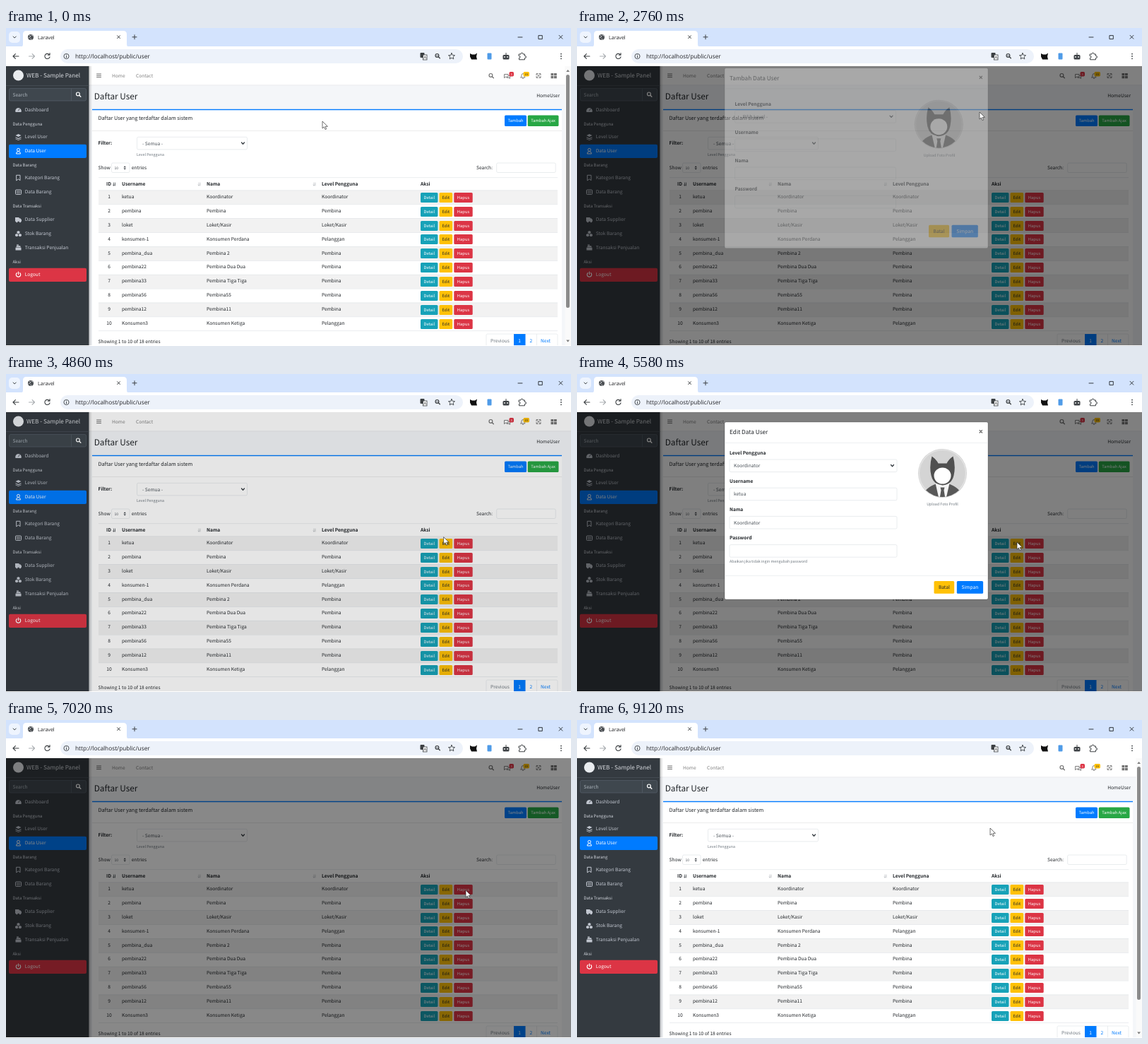
An HTML page that plays this animation: 800 px wide and 450 px high, repeating every 9180 ms.

```html
<!DOCTYPE html>
<html lang="id">
<head>
<meta charset="utf-8">
<title>Daftar User</title>
<style>
  html, body { margin: 0; width: 100%; height: 100%; overflow: hidden; background: #fff; }
  svg { display: block; width: 100vw; height: 100vh; }
  text { font-family: "Noto Sans CJK JP", "Noto Sans CJK SC", "Noto Sans CJK", "Open Sans", sans-serif;
         text-rendering: geometricPrecision; white-space: pre; }
  .ui { font-family: "Open Sans", "Noto Sans", sans-serif; }
</style>
</head>
<body>
<svg id="stage" viewBox="0 0 800 450" xmlns="http://www.w3.org/2000/svg"></svg>
<script>
const LOOP = 9180, STEP = 60;
const TOP = 54, HEIGHT = 395; // page area below the browser bars
const BLUE = '#007bff', RED = '#dc3545', YELLOW = '#ffc107', TEAL = '#17a2b8', GREEN = '#28a745';
const INK = '#212529', BORDER = '#d3d8dd', LINE = '#dee2e6', MUTED = '#6c757d';
const BODY = 6.63, SMALL = 5.3, BTN = 5.8;

// Drawing helpers; every one returns SVG markup.
const rect = (x, y, w, h, fill, more = '') =>
  `<rect x="${x}" y="${y}" width="${w}" height="${h}" fill="${fill}" ${more}/>`;
const box = (x, y, w, h) => rect(x, y, w, h, '#fff', `rx="1.8" stroke="${BORDER}" stroke-width=".5"`);
const circle = (x, y, r, fill, more = '') => `<circle cx="${x}" cy="${y}" r="${r}" fill="${fill}" ${more}/>`;
const line = (d, color = INK, w = 1) =>
  `<path d="${d}" fill="none" stroke="${color}" stroke-width="${w}" stroke-linecap="round" stroke-linejoin="round"/>`;
const shape = (d, fill) => `<path d="${d}" fill="${fill}"/>`;
const at = (x, y, body) => `<g transform="translate(${x} ${y})">${body}</g>`;
const text = (x, cy, s, { size = BODY, fill = INK, bold, anchor = 'start', cls = '' } = {}) =>
  `<text x="${x}" y="${cy + size * 0.36}" font-size="${size}" fill="${fill}" class="${cls}"
    font-weight="${bold ? 700 : 400}" text-anchor="${anchor}">${s}</text>`;
const button = (x, y, w, h, label, fill, size = BTN) =>
  rect(x, y, w, h, fill, 'rx="1.6"') +
  text(x + w / 2, y + h / 2, label, { size, fill: fill === YELLOW ? INK : '#fff', anchor: 'middle' });
const chevron = (x, y) => line(`M${x - 2} ${y - 1}l2 2.2 2-2.2`, '#343a40', 1.3);
const lens = (x, y, color) =>
  circle(x - .6, y - .6, 2.4, 'none', `stroke="${color}" stroke-width="1.2"`) + line(`M${x + 1.3} ${y + 1.3}l2 2`, color, 1.4);
const cross = (x, y, r, color = INK, w = .9) =>
  line(`M${x - r} ${y - r}l${2 * r} ${2 * r}m0 ${-2 * r}l${-2 * r} ${2 * r}`, color, w);

function browser() {
  const dark = '#3c4043', ui = size => ({ size, fill: '#202124', cls: 'ui' });
  return rect(0, 0, 800, 27, '#d3e3fd') + rect(0, 26, 800, TOP - 26, '#fff') +
    rect(4, 5, 16, 16, '#eef4fe', 'rx="5"') + line('M10.2 12l2 2.1 2-2.1', dark) +
    shape('M20 27q4 0 4-4V9q0-5 5-5h137q5 0 5 5v14q0 4 4 4z', '#fff') +
    circle(35, 13, 4, '#4a4e52') + line('M33 10l2 2-3 2m4-4l2 1m-3 4l1 2', '#d8dadd', .9) +
    text(45, 13, 'Laravel', ui(7.1)) + cross(159.5, 12.7, 1.9) + line('M182 9.8v6m-3-3h6', dark) +
    line('M725 13h6M754.3 10.6h5v5h-5z', INK, .9) + cross(785.5, 12.8, 2.4) +
    line('M18 40h-8m3.4-3.4L10 40l3.4 3.4', dark, 1.1) + line('M32.5 40h8m-3.4-3.4l3.4 3.4-3.4 3.4', '#a9adb1', 1.1) +
    line('M61.4 37.8a3.6 3.6 0 1 0 .6 3M62 35.5v2.7h-2.7', dark, 1.1) +
    rect(77, 30, 570, 20, '#edf2fa', 'rx="10"') +
    circle(85.5, 40, 3.6, 'none', `stroke="${dark}" stroke-width=".9"`) + line('M85.5 39.8v2M85.5 38v.1', dark) +
    text(98, 39.7, 'http://localhost/public/user', ui(8.3)) +
    rect(586.5, 35, 6, 7, dark, 'rx="1"') + rect(590.5, 38, 5.5, 7, '#fff', `stroke="${dark}" stroke-width=".8"`) +
    line('M592 43l1.3-3 1.3 3', dark, .7) +
    lens(611, 39.5, dark) + line('M609.5 39h2', dark, .7) +
    line('M631 35.5l1.3 2.9 3.2.3-2.4 2.1.7 3.1-2.8-1.6-2.8 1.6.7-3.1-2.4-2.1 3.2-.3z', dark, .9) +
    shape('M657 36l3 1.5h4l3-2-1 5 1 4h-8l-2-4z', '#111') +
    rect(681.5, 35.5, 6, 9, '#4f9be8', 'rx="1"') +
    rect(703.5, 38, 9, 6.5, '#3f4347', 'rx="1.5"') + circle(706, 41, .9, '#fff') + circle(710, 41, .9, '#fff') +
    line('M708 38v-2.5', dark) +
    line('M726.5 37h2.5q0-2 1.5-2t1.5 2h2.5v2.5q2 0 2 1.5t-2 1.5v2.3h-8v-2.6q1.7 0 1.7-1.3t-1.7-1.3z', dark, 1) +
    [36.7, 40, 43.3].map(y => circle(786, y, .9, dark)).join('');
}

// Small sidebar icons, centred on 0,0.
const ICONS = {
  gauge: c => shape('M-4 3a4.3 4.3 0 1 1 8 0z', c) + line('M0 1l1.6-2.6', '#343a40', .8),
  layers: c => shape('M0-4l4 2-4 2-4-2zM-4 .2l4 1.8 4-1.8v1l-4 2-4-2zM-4 2.4l4 1.8 4-1.8v.8L0 5l-4-1.8z', c),
  person: c => circle(0, -1.6, 2, 'none', `stroke="${c}"`) + line('M-3 3.6q0-3 3-3t3 3z', c),
  mark: c => line('M-2.5-3.7h5v7.4L0 1.7l-2.5 2z', c),
  list: c => rect(-4, -3, 8, 6.5, 'none', `stroke="${c}" rx="1"`) + line('M-2.3-.8h4.6M-2.3 1.3h4.6', c, .9),
  truck: c => shape('M-4.5-3h5.5v1.3h1.7l1.8 2v2.4h-9z', c) + circle(-2.2, 3, 1.3, c) + circle(2.5, 3, 1.3, c),
  cubes: c => shape('M0-4l2 1v2.2L0 .2-2-.8V-3zM-2.4 0l2 1v2.2l-2 1-2-1V1zM2.4 0l2 1v2.2l-2 1-2-1V1z', c),
  till: c => shape('M-4 .3h8V4h-8zM-3.2-.3l.8-2h5l.8 2zM-2.5-4h3v1.3h-3z', c),
  power: c => line('M-2.2-2.3a3.2 3.2 0 1 0 4.4 0M0-4v3.6', c, 1.2)
};

const MENU = [
  [116, 'Dashboard', 'gauge'], [136, 'Data Pengguna'], [154, 'Level User', 'layers'],
  [174, 'Data User', 'person', BLUE], [194, 'Data Barang'], [212, 'Kategori Barang', 'mark'],
  [232, 'Data Barang', 'list'], [252, 'Data Transaksi'], [271, 'Data Supplier', 'truck'],
  [291, 'Stok Barang', 'cubes'], [310.5, 'Transaksi Penjualan', 'till'], [331, 'Aksi'],
  [349, 'Logout', 'power', RED]
];

function sidebar() {
  const pale = '#c2c7d0';
  const items = MENU.map(([y, label, icon, fill]) => {
    if (!icon) return text(9.5, y, label, { size: 5.95, fill: '#d0d4db' });
    const color = fill ? '#fff' : pale;
    return (fill ? rect(4, y - 9.3, 110, 19.3, fill, 'rx="2"') : '') +
      at(17.5, y, ICONS[icon](color)) + text(26.7, y, label, { fill: color });
  });
  return rect(117, TOP, 5, HEIGHT, 'url(#edge)') +
    rect(0, TOP, 117.4, HEIGHT, '#343a40') + rect(0, 81, 117.4, .7, '#4b545c') +
    circle(17.5, 67, 7.5, '#e9ecef') + text(29, 67.5, 'WEB - Sample Panel', { size: 8.2, fill: '#d5d8dc' }) +
    rect(4.5, 85.5, 109, 17.5, '#3f474e', 'rx="2" stroke="#56606a" stroke-width=".7"') +
    rect(92, 85.5, .7, 17.5, '#56606a') +
    text(9.5, 94.5, 'Search', { fill: '#adb5bd' }) + lens(102.5, 94, '#fff') + items.join('');
}

function navbar() {
  const gray = '#737373';
  return rect(117, TOP, 683, HEIGHT, '#f4f6f9') + rect(117, TOP, 683, 27, '#fff') + rect(117, 80.6, 683, .6, LINE) +
    line('M128.5 65h6M128.5 67.3h6M128.5 69.6h6', gray, 1) +
    text(150, 67.5, 'Home', { fill: '#808080' }) + text(184, 67.5, 'Contact', { fill: '#808080' }) +
    lens(687, 67.5, gray) +
    line('M705.5 70.5v-5h5.5v3.7h-3.6zM712 67.5h1.5v4l-1.5-1.2h-3', gray, .9) +
    rect(712.5, 62, 6.5, 6.5, RED, 'rx="1.8"') + text(715.7, 65.3, '3', { size: 4, fill: '#fff', anchor: 'middle' }) +
    line('M729 70h6q-1-1-1-3.2t-2-2.2-2 2.2-1 3.2M731.4 71.3h1.2', gray, .9) +
    rect(732.5, 62, 8.5, 6.5, YELLOW, 'rx="1.8"') + text(736.7, 65.3, '15', { size: 4, anchor: 'middle' }) +
    line('M751 66.5v-2h2m2 0h2v2m0 2v2h-2m-2 0h-2v-2M752 65.5l4 4m0-4l-4 4', gray, .9) +
    [[771.5, 64], [776, 64], [771.5, 68], [776, 68]].map(([x, y]) => rect(x, y, 3.8, 3.3, gray)).join('') +
    text(124.7, 96.5, 'Daftar User', { size: 11.8 }) + text(784, 95.5, 'HomeUser', { anchor: 'end' });
}

const USERS = [
  ['ketua', 'Koordinator', 'Koordinator'], ['pembina', 'Pembina', 'Pembina'],
  ['loket', 'Loket/Kasir', 'Loket/Kasir'], ['konsumen-1', 'Konsumen Perdana', 'Pelanggan'],
  ['pembina_dua', 'Pembina 2', 'Pembina'], ['pembina22', 'Pembina Dua Dua', 'Pembina'],
  ['pembina33', 'Pembina Tiga Tiga', 'Pembina'], ['pembina56', 'Pembina55', 'Pembina'],
  ['pembina12', 'Pembina11', 'Pembina'], ['Konsumen3', 'Konsumen Ketiga', 'Pelanggan']
];

function table() {
  const pitch = 19.88, top = 229.6;
  const head = [[164, 'Username'], [284, 'Nama'], [447, 'Level Pengguna'], [587, 'Aksi']];
  const sort = (x, color) => line(`M${x} 219v4m-1-1l1 1.2 1-1.2M${x + 2} 223v-4`, color, .7);
  const rows = USERS.map((user, i) => {
    const y = top + pitch * i, mid = y + 9, by = Math.round(y + 3.2);
    return (i % 2 ? '' : rect(131, y, 650, pitch, '#f2f2f2')) + rect(131, y, 650, .6, LINE) +
      text(146, mid, i + 1, { anchor: 'middle' }) +
      user.map((s, k) => text(head[k][0], mid, s)).join('') +
      button(587, by, 24.5, 14, 'Detail', TEAL) + button(613.5, by, 18.7, 14, 'Edit', YELLOW) +
      button(634.3, by, 26.4, 14, 'Hapus', RED);
  });
  return rect(131, 211.5, 650, .6, LINE) + text(142, 220.7, 'ID', { bold: true }) +
    head.map(([x, s]) => text(x, 220.7, s, { bold: true })).join('') +
    sort(152.5, '#343a40') + sort(273, '#b5b9bd') + sort(436, '#b5b9bd') +
    rows.join('') + rect(131, top + pitch * 10, 650, .6, LINE);
}

function card() {
  return rect(122, 115, 665, 334, '#fff') + rect(122, 114.8, 665, 1.4, BLUE) +
    text(130.5, 127, 'Daftar User yang terdaftar dalam sistem', { size: 7.26 }) +
    button(706, 123.5, 31, 15.5, 'Tambah', BLUE) + button(738.7, 123.5, 43.8, 15.5, 'Tambah Ajax', GREEN) +
    rect(122, 145, 665, .6, '#dfdfdf') +
    text(130.5, 163, 'Filter:', { bold: true }) + box(185.5, 154.3, 156, 17.6) +
    text(193, 163.5, '- Semua -', { fill: '#495057' }) + chevron(335.5, 163) +
    text(185, 179, 'Level Pengguna', { size: SMALL, fill: MUTED }) +
    text(130.5, 197.7, 'Show') + box(149.5, 191, 25.5, 13.5) + text(153.5, 198, '10', { size: 5, fill: '#495057' }) +
    shape('M166.5 197.2l1.7-2 1.7 2zM166.5 198.6l1.7 2 1.7-2z', '#343a40') + text(177.7, 197.7, 'entries') +
    text(666, 197.7, 'Search:') + box(694.7, 191, 83.5, 13.5) + table() +
    text(130.5, 444, 'Showing 1 to 10 of 18 entries') +
    rect(680, 433, 101, 20, '#fff', `stroke="${LINE}" stroke-width=".6" rx="1.8"`) +
    text(686, 442.3, 'Previous', { fill: MUTED }) + rect(719, 433, 16.5, 16, BLUE) +
    text(727.2, 442.3, '1', { fill: '#fff', anchor: 'middle' }) +
    text(743.3, 442.3, '2', { fill: BLUE, anchor: 'middle' }) + rect(751, 433, .6, 16, LINE) +
    text(757, 442.3, 'Next', { fill: BLUE });
}

const scrollbar = () => rect(791.5, TOP, 8.5, HEIGHT, '#fafafa') + rect(793, 66, 5, 330, '#8b8b8b', 'rx="2.5"') +
  shape('M793.2 62l2.4-3 2.4 3zM793.2 441.5l2.4 3 2.4-3z', '#7a7a7a');

const avatar = (x, y) => at(x, y, circle(0, 0, 34.5, '#d4d4d4') +
  circle(0, 0, 33, 'none', 'stroke="#e6e6e6" stroke-width="1.2"') +
  `<g clip-path="url(#disc)">
    ${shape('M-28 36Q-27 21-9 15H9Q27 21 28 36z', '#585858')}
    ${shape('M-10 14H10L5 36H-5z', '#f4f4f4')}
    ${shape('M-3 20H3L2 24 4 36H-4L-2 24z', '#585858')}
    ${shape('M-16 3Q-19-10-15-24-9-20-6-14H6Q9-20 15-24 19-10 16 3 13 16 0 17-13 16-16 3z', '#505050')}
  </g>` + `<ellipse cx="0" cy="3.5" rx="12" ry="11.5" fill="#fff"/>`);

const caption = x => text(x, 184, 'Upload Foto Profil', { size: SMALL, fill: MUTED, anchor: 'middle' });

function frame(top, bottom, title, content) {
  return rect(209, top, 373, bottom - top, '#fff', 'rx="2" stroke="#000" stroke-opacity=".3" stroke-width=".8"') +
    text(216, top + 14.3, title, { size: 8.25 }) + cross(571.8, top + 13.3, 1.7, '#555', 1.2) +
    rect(209, top + 29, 373, .6, '#e3e6e9') + content;
}

function form(x, w, level, name, fullName) {
  const fields = [['Level Pengguna', level], ['Username', name], ['Nama', fullName], ['Password', '']];
  return fields.map(([label, value], i) => {
    const y = 111.5 + 40.2 * i;
    return text(x, y, label, { bold: true }) + box(x, y + 9.5, w, 17.6) +
      text(x + 6, y + 18.3, value, { fill: '#495057' });
  }).join('') + chevron(x + w - 6.5, 129.5);
}

const facts = (x, y, w, gap, pairs) => pairs.map(([label, value], i) => {
  const top = y + 16.4 * i;
  return rect(x, top, w, 16.4, i % 2 ? '#fff' : '#f2f2f2') + rect(x, top, w, .6, LINE) +
    text(x + 2.5, top + 8.3, label, { bold: true }) + text(x + gap, top + 8.3, value);
}).join('');

const [login, fullName, level] = USERS[0];
const MODALS = [
  { open: 800, close: 2658, body: frame(61, 316, 'Tambah Data User',
      form(223.5, 228, ' - Pilih Level -', '', '') + avatar(512.3, 140.5) + caption(513) +
      button(498, 283, 29, 17.6, 'Batal', YELLOW, BODY) + button(530.5, 283, 37.3, 17.6, 'Simpan', BLUE, BODY)) },
  { open: 3240, close: 4440, body: frame(68, 202.5, 'Data User',
      avatar(251.3, 150) + facts(298, 105.7, 280, 44.3,
        [['ID', 1], ['Level', level], ['Username', login], ['Nama', fullName], ['Password', '********']])) },
  { open: 5040, close: 6180, body: frame(68, 319, 'Edit Data User',
      form(216, 237, level, login, fullName) + avatar(517.5, 140.5) + caption(517.5) +
      text(216, 265.5, 'Abaikan jika tidak ingin mengubah password', { size: SMALL, fill: MUTED }) +
      rect(209, 285, 373, .6, '#e3e6e9') +
      button(505.5, 293, 28.7, 17.8, 'Batal', YELLOW, BODY) + button(537.8, 293, 37.3, 17.8, 'Simpan', BLUE, BODY)) },
  { open: 6880, close: 8340, body: frame(68, 238, 'Hapus Data User',
      rect(216, 104, 359, 36, YELLOW, 'rx="2"') + text(225, 114.5, 'Konfirmasi !!!', { size: 8.25 }) +
      text(225, 129, 'Apakah Anda ingin menghapus data seperti di bawah ini?') +
      facts(216, 148, 359, 92, [['Level Pengguna :', level], ['Username :', login], ['Nama :', fullName]]) +
      rect(209, 205, 373, .6, '#e3e6e9') +
      button(493, 213, 28.7, 17.8, 'Batal', YELLOW, BODY) + button(525, 213, 50, 17.8, 'Ya, Hapus', BLUE, BODY)) }
];

// Cursor path: time, x, y
const PATH = [
  [0, 448, 132], [120, 450, 132], [660, 758, 131], [960, 758, 131], [1500, 634, 171], [1680, 632, 170],
  [2400, 571, 73], [2640, 571, 75], [2760, 570, 119], [3120, 599, 239], [3420, 599, 239],
  [4020, 543, 99], [4300, 571, 81], [4460, 571, 81], [4920, 622, 238], [5580, 623, 238],
  [6060, 571, 81], [6200, 571, 81], [6720, 651, 241], [7260, 651, 241],
  [7980, 571, 81], [8400, 571, 81], [8880, 585, 153], [LOOP, 585, 153]
];

const stage = document.getElementById('stage');
stage.innerHTML = `<defs>
    <clipPath id="disc"><circle r="33.5"/></clipPath>
    <linearGradient id="edge"><stop stop-opacity=".22"/><stop offset="1" stop-opacity="0"/></linearGradient>
  </defs>` +
  navbar() + card() + `<g id="scroll">${scrollbar()}</g>` + sidebar() +
  rect(0, TOP, 800, HEIGHT, '#000', 'id="shade"') +
  MODALS.map(m => `<g class="modal">${m.body}</g>`).join('') +
  rect(0, TOP + HEIGHT, 800, 1, '#fff') + browser() +
  `<path id="cursor" d="M0 0V10L2.4 7.9 4 11.6 5.7 10.9 4.1 7.3H7.4Z" fill="#fff" stroke="#333" stroke-width=".7"/>`;

const shade = document.getElementById('shade'), scroll = document.getElementById('scroll');
const cursor = document.getElementById('cursor'), dialogs = [...document.querySelectorAll('.modal')];
const clamp = v => Math.max(0, Math.min(1, v));
const smooth = p => p * p * (3 - 2 * p);
const easeOut = p => 1 - (1 - p) ** 1.6;

function draw(t) {
  let dim = 0;
  MODALS.forEach(({ open, close }, i) => {
    const shown = t - open - 150, gone = t - close;
    const opacity = clamp(shown / 150) * (1 - clamp(gone / 150));
    const lift = gone > 0 ? easeOut(clamp(gone / 300)) : 1 - easeOut(clamp(shown / 300));
    dialogs[i].setAttribute('opacity', opacity);
    dialogs[i].setAttribute('transform', `translate(0 ${-9 * lift})`);
    dim = Math.max(dim, clamp((t - open) / 150) * (1 - clamp((gone - 300) / 150)));
  });
  shade.setAttribute('opacity', dim / 2);
  scroll.setAttribute('visibility', dim ? 'hidden' : 'visible');

  const k = PATH.findIndex(p => p[0] > t);
  const [t0, x0, y0] = PATH[k - 1], [t1, x1, y1] = PATH[k];
  const p = smooth((t - t0) / (t1 - t0));
  cursor.setAttribute('transform', `translate(${x0 + (x1 - x0) * p} ${y0 + (y1 - y0) * p})`);
}

const start = performance.now();
function tick() {
  const t = (performance.now() - start) % LOOP;
  draw(Math.floor(t / STEP) * STEP);
  requestAnimationFrame(tick);
}
tick();
</script>
</body>
</html>
```
